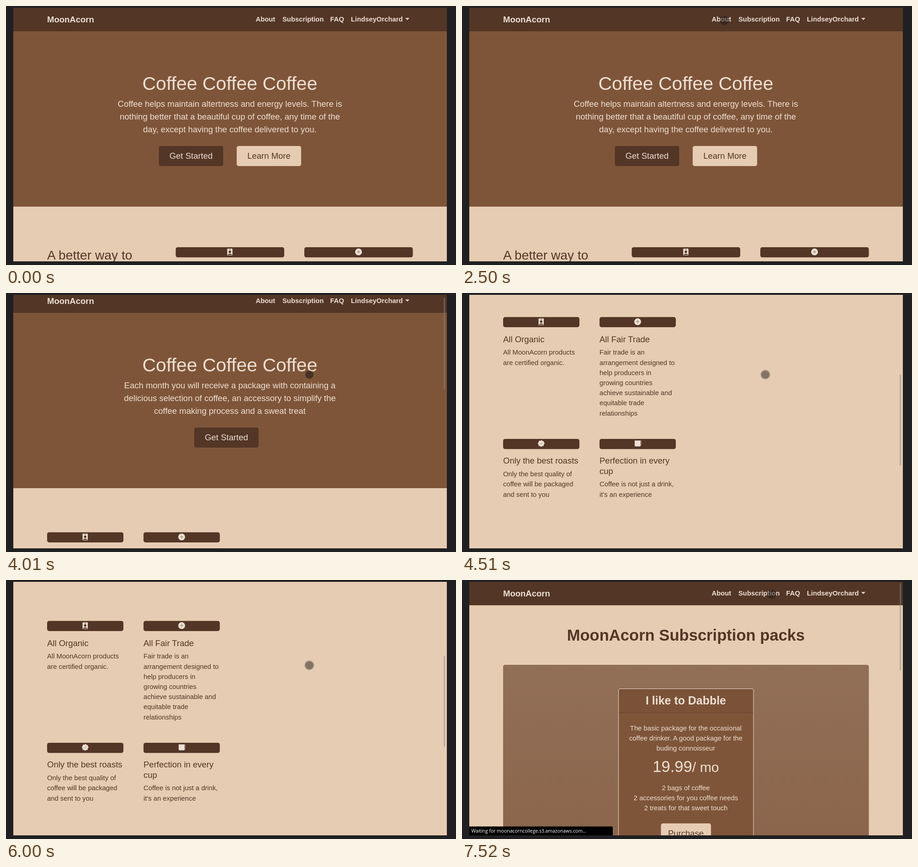
These frames come from a looping animation (985x568 px, 8000 ms). An HTML page:

```html
<!DOCTYPE html>
<html lang="en">
<head>
<meta charset="utf-8">
<title>Coffee shop walkthrough</title>
<style>
  :root { --dark: #533626; --brown: #7f5539; --tan: #e6ccb2; --cream: #ede0d4; }
  html, body { margin: 0; width: 100%; height: 100%; overflow: hidden; background: #202022; }
  svg { display: block; }
  text { font-family: "Liberation Sans", Arial, sans-serif; font-size: 14.81px; fill: var(--cream); }
  .dark { fill: var(--dark); }
  .brown { fill: var(--brown); }
  .tan { fill: var(--tan); }
  .cream { fill: var(--cream); }
  .b { font-weight: bold; }
  .mid { text-anchor: middle; }
  .small { font-size: 12.96px; }
  .lead { font-size: 18.5px; }
  .h3 { font-size: 24.95px; }
  .h2 { font-size: 28.2px; }
  .h1 { font-size: 34.6px; }
  .display { font-size: 41px; }
  .status { font-family: "Open Sans", "Noto Sans", sans-serif; font-size: 10.4px; fill: #fff; }

  /* Every change is a hard cut on one 8 s clock. */
  #scroll, #home, #about, #sub, #bar, #cursor, #dot, #ring {
    animation: 8s step-end infinite;
  }
  #scroll { animation-name: scroll; }
  #home { animation-name: home; }
  #about { animation-name: about; }
  #sub { animation-name: sub; }
  #bar { animation-name: bar; fill: rgba(136, 132, 128, .5); }
  #cursor { animation-name: cursor; }
  #dot { animation-name: dot; fill: #1e1a18; }
  #ring { animation-name: ring; fill: none; stroke: #1e1a18; stroke-width: 1.5; }

  @keyframes home { 0% { visibility: visible } 37.5%, 100% { visibility: hidden } }
  @keyframes about { 0% { visibility: hidden } 37.5% { visibility: visible } 94%, 100% { visibility: hidden } }
  @keyframes sub { 0% { visibility: hidden } 94%, 100% { visibility: visible } }
  @keyframes scroll {
    0% { transform: translateY(0) }
    50.125% { transform: translateY(-12px) }
    56.375% { transform: translateY(-484px) }
    62.625% { transform: translateY(-966px) }
    75% { transform: translateY(-447px) }
    81.375%, 100% { transform: translateY(0) }
  }
  @keyframes bar {
    0% { opacity: 0; transform: translateY(0); height: 199px }
    37.5% { opacity: .5; transform: translateY(0); height: 199px }
    43.875% { opacity: 0; transform: translateY(0); height: 199px }
    50.125% { opacity: 1; transform: translateY(4px); height: 199px }
    56.375% { opacity: 1; transform: translateY(172px); height: 199px }
    62.625% { opacity: 1; transform: translateY(343px); height: 199px }
    68.875% { opacity: 0; transform: translateY(343px); height: 199px }
    75% { opacity: 1; transform: translateY(159px); height: 199px }
    81.375% { opacity: 1; transform: translateY(0); height: 199px }
    87.875% { opacity: 0; transform: translateY(0); height: 199px }
    94%, 100% { opacity: 1; transform: translateY(0); height: 191px }
  }
  @keyframes cursor {
    0% { transform: translate(-40px, -40px) }
    6.25% { transform: translate(788px, 407px) }
    12.5% { transform: translate(535px, 177px) }
    18.75% { transform: translate(455px, 41.5px) }
    25% { transform: translate(584.5px, 32px) }
    31.25% { transform: translate(574.5px, 32px) }
    37.5% { transform: translate(643px, 38px) }
    43.875% { transform: translate(664px, 45px) }
    50.125% { transform: translate(664px, 179px) }
    62.625% { transform: translate(664px, 188px) }
    68.875% { transform: translate(664px, 187px) }
    81.375% { transform: translate(674px, 56px) }
    87.875%, 100% { transform: translate(678px, 31px) }
  }
  @keyframes dot {
    0% { fill-opacity: .5 }
    50.125% { fill-opacity: .6 }
    56.375%, 100% { fill-opacity: .5 }
  }
  @keyframes ring {
    0% { stroke-opacity: 0 }
    12.5% { stroke-opacity: .25 }
    50.125% { stroke-opacity: 0 }
    56.375%, 100% { stroke-opacity: .25 }
  }
</style>
</head>
<body>
<svg width="985" height="568" viewBox="0 0 985 568">
  <defs>
    <clipPath id="view"><rect x="16" y="4" width="949" height="556"/></clipPath>
    <linearGradient id="sheen" x1="0" y1="0" x2="0" y2="1">
      <stop offset="0" stop-color="#926f57"/><stop offset="1" stop-color="#7f5539"/>
    </linearGradient>
    <!-- icons are centred on 0,0 -->
    <g id="badge">
      <rect class="cream" x="-5.7" y="-7.2" width="11.4" height="14.6" rx="1.4"/>
      <rect class="dark" x="-2.2" y="-5.8" width="4.4" height="1" rx=".5"/>
      <circle class="dark" cy="-.3" r="2.7"/>
      <path class="dark" d="M-4.4 6.4V5.6C-3.6 3.4 3.6 3.4 4.4 5.6V6.4Z"/>
    </g>
    <g id="plus">
      <circle class="cream" r="7.5"/>
      <path d="M-3.7 0H3.7M0-3.7V3.7" stroke="#8a7565" stroke-width="1"/>
    </g>
    <g id="patch">
      <circle class="cream" r="6.2"/>
      <circle class="cream" r="6.3" fill="none" stroke="#ede0d4" stroke-width="2.4" stroke-linecap="round" stroke-dasharray="0 4.948"/>
      <path d="M-2.6 .2L-.7 2L2.8-1.8" fill="none" stroke="#8a7565"/>
    </g>
    <g id="cup">
      <path d="M6-5.4H8V2.5Q8 4.6 6 4.6" fill="none" stroke="#b08968" stroke-width="1"/>
      <path class="cream" d="M-6.5-6.5H6.5V4.5Q6.5 6.5 4.5 6.5H-4.5Q-6.5 6.5-6.5 4.5Z"/>
    </g>
  </defs>

  <g clip-path="url(#view)">
    <rect class="tan" x="16" y="4" width="949" height="556"/>

    <g id="scroll">
      <rect class="dark" x="16" y="4" width="949" height="52"/>
      <text class="b lead" x="90" y="36">MoonAcorn</text>
      <text class="b" x="546.5" y="34.3">About</text>
      <text class="b" x="605" y="34.3">Subscription</text>
      <text class="b" x="709.5" y="34.3">FAQ</text>
      <text class="b" x="755" y="34.3">LindseyOrchard</text>
      <path class="cream" d="M874 26.3H883L878.5 30.8Z"/>

      <rect class="brown" x="16" y="55.5" width="949" height="384.5"/>
      <text class="display mid" x="490" y="183.7">Coffee Coffee Coffee</text>

      <g id="home">
        <text class="lead mid" y="221.3"><tspan x="490">Coffee helps maintain altertness and energy levels. There is</tspan><tspan x="490" dy="27.8">nothing better that a beautiful cup of coffee, any time of the</tspan><tspan x="490" dy="27.8">day, except having the coffee delivered to you.</tspan></text>
        <rect class="dark" x="334.5" y="307" width="141" height="44" rx="4.4"/>
        <text class="lead mid" x="405" y="335.3">Get Started</text>
        <rect class="tan" x="505" y="307" width="141" height="44" rx="4.4"/>
        <text class="lead mid dark" x="575.5" y="335.3">Learn More</text>
        <text class="h2 dark" x="90" y="556.3">A better way to</text>
        <rect class="dark" x="371.5" y="529" width="237.5" height="22.2" rx="4.4"/>
        <use href="#badge" x="490" y="539.3"/>
        <rect class="dark" x="653" y="529" width="237.5" height="22.2" rx="4.4"/>
        <use href="#plus" x="771.7" y="539.3"/>
      </g>

      <g id="about">
        <text class="lead mid" y="221.3"><tspan x="490">Each month you will receive a package with containing a</tspan><tspan x="490" dy="27.8">delicious selection of coffee, an accessory to simplify the</tspan><tspan x="490" dy="27.8">coffee making process and a sweat treat</tspan></text>
        <rect class="dark" x="412" y="307" width="141" height="44" rx="4.4"/>
        <text class="lead mid" x="482.5" y="335.3">Get Started</text>

        <g class="dark">
          <rect x="90" y="536.7" width="167" height="22.2" rx="4.4"/>
          <rect x="301" y="536.7" width="167" height="22.2" rx="4.4"/>
          <rect x="90" y="804" width="167" height="22.2" rx="4.4"/>
          <rect x="301" y="804" width="167" height="22.2" rx="4.4"/>
        </g>
        <use href="#badge" x="173.3" y="547"/>
        <use href="#plus" x="384.5" y="547"/>
        <use href="#patch" x="173.3" y="814"/>
        <use href="#cup" x="384.5" y="814"/>

        <text class="lead dark" x="90" y="591.5">All Organic</text>
        <text class="dark" y="619.3"><tspan x="90">All MoonAcorn products</tspan><tspan x="90" dy="22.2">are certified organic.</tspan></text>
        <text class="lead dark" x="301" y="591.5">All Fair Trade</text>
        <text class="dark" y="619.3"><tspan x="301">Fair trade is an</tspan><tspan x="301" dy="22.2">arrangement designed to</tspan><tspan x="301" dy="22.2">help producers in</tspan><tspan x="301" dy="22.2">growing countries</tspan><tspan x="301" dy="22.2">achieve sustainable and</tspan><tspan x="301" dy="22.2">equitable trade</tspan><tspan x="301" dy="22.2">relationships</tspan></text>
        <text class="lead dark" x="90" y="858.4">Only the best roasts</text>
        <text class="dark" y="886.2"><tspan x="90">Only the best quality of</tspan><tspan x="90" dy="22.2">coffee will be packaged</tspan><tspan x="90" dy="22.2">and sent to you</tspan></text>
        <text class="lead dark" y="858.4"><tspan x="301">Perfection in every</tspan><tspan x="301" dy="22.2">cup</tspan></text>
        <text class="dark" y="908.4"><tspan x="301">Coffee is not just a drink,</tspan><tspan x="301" dy="22.2">it's an experience</tspan></text>

        <g transform="translate(0 966)">
          <rect x="90" y="154.5" width="800.5" height="249.5" rx="4.4" fill="url(#sheen)"/>
          <text class="h3 b mid" x="490" y="226">Keep up to date with all things coffee</text>
          <text class="mid" x="490" y="252.8">To keep up to date with the latest MoonAcorn news, Signup to our newsletter.</text>
          <rect x="388.5" y="282" width="204" height="34.5" rx="3.5" fill="#fff" stroke="#ced4da"/>
          <text x="400" y="304" style="fill:#6c757d">Email address...</text>
          <rect class="dark" x="451" y="317" width="78" height="35" rx="3.5"/>
          <text class="b mid" x="490.3" y="339.3">Sign up</text>

          <rect class="dark" x="16" y="492.7" width="949" height="68"/>
          <text class="b small" x="27" y="530">MoonAcorns © 2021-2022</text>
          <text class="b" x="414" y="531">Shipping</text>
          <text class="b mid" x="487" y="531">·</text>
          <text class="b" x="497" y="531">Policies</text>
          <text class="b mid" x="563.7" y="531">·</text>
          <text class="b" x="574" y="531">Contact</text>
          <g class="cream">
            <circle cx="871" cy="525.5" r="7.3"/>
            <rect x="897.5" y="518" width="15" height="15"/>
            <circle cx="938.7" cy="525.5" r="7.5"/>
          </g>
        </g>
      </g>

      <g id="sub">
        <rect class="tan" x="16" y="55.5" width="949" height="505"/>
        <text class="h1 b mid dark" x="490" y="132.5">MoonAcorn Subscription packs</text>
        <rect x="90" y="186" width="800.5" height="1000" rx="4.4" fill="url(#sheen)"/>
        <rect class="brown" x="342.5" y="238.5" width="295.5" height="400" rx="3.5" stroke="#ede0d4"/>
        <path d="M343 291V242Q343 239 346 239H634.5Q637.5 239 637.5 242V291Z" fill="#000" fill-opacity=".03"/>
        <path d="M343 291.5H637.5" stroke="#000" stroke-opacity=".25"/>
        <text class="h3 b mid" x="490" y="273">I like to Dabble</text>
        <text class="mid" y="329.8"><tspan x="490">The basic package for the occasional</tspan><tspan x="490" dy="22.2">coffee drinker. A good package for the</tspan><tspan x="490" dy="22.2">buding connoisseur</tspan></text>
        <text class="h1 mid" x="490" y="420.8">19.99<tspan font-size="30.3">/ mo</tspan></text>
        <text class="mid" y="460.5"><tspan x="490">2 bags of coffee</tspan><tspan x="490" dy="22.2">2 accessories for you coffee needs</tspan><tspan x="490" dy="22.2">2 treats for that sweet touch</tspan></text>
        <rect class="tan" x="435.5" y="533.7" width="109.5" height="44" rx="4.4"/>
        <text class="lead mid dark" x="490" y="562">Purchase</text>
        <path d="M16 540.5H327Q330 540.5 330 543.5V560H16Z"/>
        <text class="status" x="20.5" y="554">Waiting for moonacorncollege.s3.amazonaws.com...</text>
      </g>
    </g>

    <rect id="bar" x="958" y="7" width="3" height="199" rx="1"/>
    <g id="cursor">
      <circle id="dot" r="9"/>
      <circle id="ring" r="9.9"/>
    </g>
  </g>
</svg>
</body>
</html>
```
